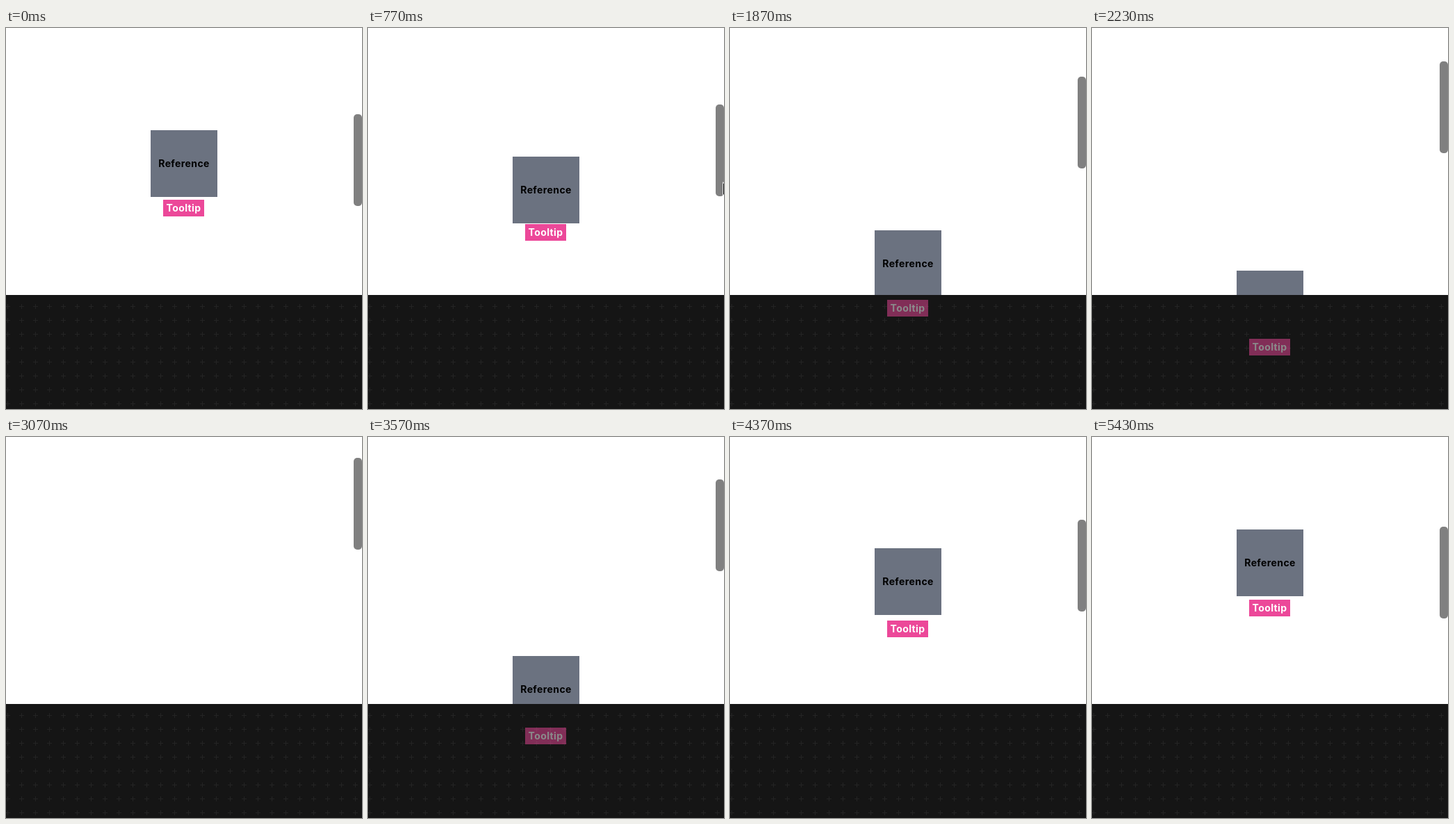
An HTML page that plays this animation: 512x548 px, repeating every 6360 ms.

```html
<!DOCTYPE html>
<html lang="en">
<head>
<meta charset="utf-8">
<title>Tooltip</title>
<style>
  html, body { margin: 0; width: 100%; height: 100%; overflow: hidden; background: #151515; }
  body { position: relative; font: 700 14px/24px Montserrat, Inter, sans-serif; letter-spacing: .4px; }
  body div, svg { position: absolute; top: 0; }
  #grid { left: 0; }
  #view { left: 0; width: 512px; height: 384px; overflow: hidden; background: #fff; }
  #box { left: 208px; width: 96px; height: 96px; line-height: 95px; text-align: center; background: #6b7280; color: #000; }
  #tip { left: 226px; width: 59px; height: 24px; text-align: center; background: #ec4899; color: #fff; }
  #thumb { left: 500px; width: 12px; height: 132px; border-radius: 5px; background: #808080; }
  #cursor { left: 0; overflow: visible; }
</style>
</head>
<body>
<svg id="grid" width="512" height="548">
  <defs>
    <pattern id="plus" x="-8" y="390" width="20" height="20" patternUnits="userSpaceOnUse">
      <path d="M7 10.5h7M10.5 7v7" stroke="#242424"/>
    </pattern>
  </defs>
  <rect y="390" width="512" height="158" fill="url(#plus)"/>
</svg>
<div id="view">
  <div id="box">Reference</div>
  <div id="thumb"></div>
</div>
<div id="tip">Tooltip</div>
<svg id="cursor" width="14" height="20">
  <path d="M0 0V17L4 13.2L6.4 18.6L9 17.5L6.6 12.2H12Z" stroke="#fff" stroke-width="1.6" paint-order="stroke"/>
</svg>
<script>
const LOOP = 6360, EDGE = 384, LAG = 15;
const [box, thumb, tip, cursor] = ['box', 'thumb', 'tip', 'cursor'].map(id => document.getElementById(id));

// [time, top of the box]
const scroll = [
  [0, 147], [440, 147], [1100, 252], [1200, 272.2], [1240, 279], [1630, 291],
  [1850, 291], [2230, 349], [2500, 378], [2670, 399.5], [3040, 399.5], [3070, 397.5],
  [3700, 294.5], [3970, 260.7], [4030, 257], [4330, 170.5], [4370, 160], [4420, 151.5],
  [4670, 142], [4880, 142], [5000, 133.4], [LOOP, 133.4]
];

const secant = i => (scroll[i + 1][1] - scroll[i][1]) / (scroll[i + 1][0] - scroll[i][0]);

// Slopes for a smooth curve that never overshoots its points
const slopes = scroll.map((_, i) => {
  if (!i || i === scroll.length - 1) return 0;
  const a = secant(i - 1), b = secant(i);
  return a * b > 0 ? 2 * a * b / (a + b) : 0;
});

function boxTop(t) {
  t = Math.max(t, 0);
  const i = scroll.findIndex((p, k) => k && t <= p[0]) - 1;
  const [t0, y0] = scroll[i], [t1, y1] = scroll[i + 1];
  const h = t1 - t0, u = (t - t0) / h, v = 1 - u;
  return y0 * v * v * (1 + 2 * u) + y1 * u * u * (3 - 2 * u)
    + h * u * v * (slopes[i] * v - slopes[i + 1] * u);
}

const mix = (a, b, u) => a.map((v, i) => v + (b[i] - v) * u);

function cursorAt(t, grip) {
  if (t >= 130 && t < 200) return mix([509, 258], [504, 250], (t - 130) / 70);
  if (t >= 200 && t < 330) return mix([504, 250], [511, 237], (t - 200) / 130);
  if (t >= 330 && t < 1300) return [511, grip];
  if (t >= 5270 && t < 5430) return mix([500, 252], [123, 519], Math.min((t - 5270) / 130, 1));
  return null;
}

const place = (el, y, x = 0) => { el.style.transform = `translate(${x}px, ${y}px)`; };

function draw(t) {
  const y = boxTop(t);
  const tipTop = Math.round(boxTop(t - LAG) + 100.2);
  const thumbTop = Math.round(124 - (y - 147) / 2.66);
  place(box, Math.round(y));
  place(thumb, thumbTop);
  place(tip, tipTop);
  tip.style.opacity = y >= EDGE ? 0 : tipTop >= EDGE ? .5 : 1;

  const at = cursorAt(t, thumbTop + 113);
  cursor.style.display = at ? '' : 'none';
  if (at) place(cursor, Math.round(at[1]), Math.round(at[0]));
}

const start = performance.now();
function tick() {
  draw((performance.now() - start) % LOOP);
  requestAnimationFrame(tick);
}
tick();
</script>
</body>
</html>
```
